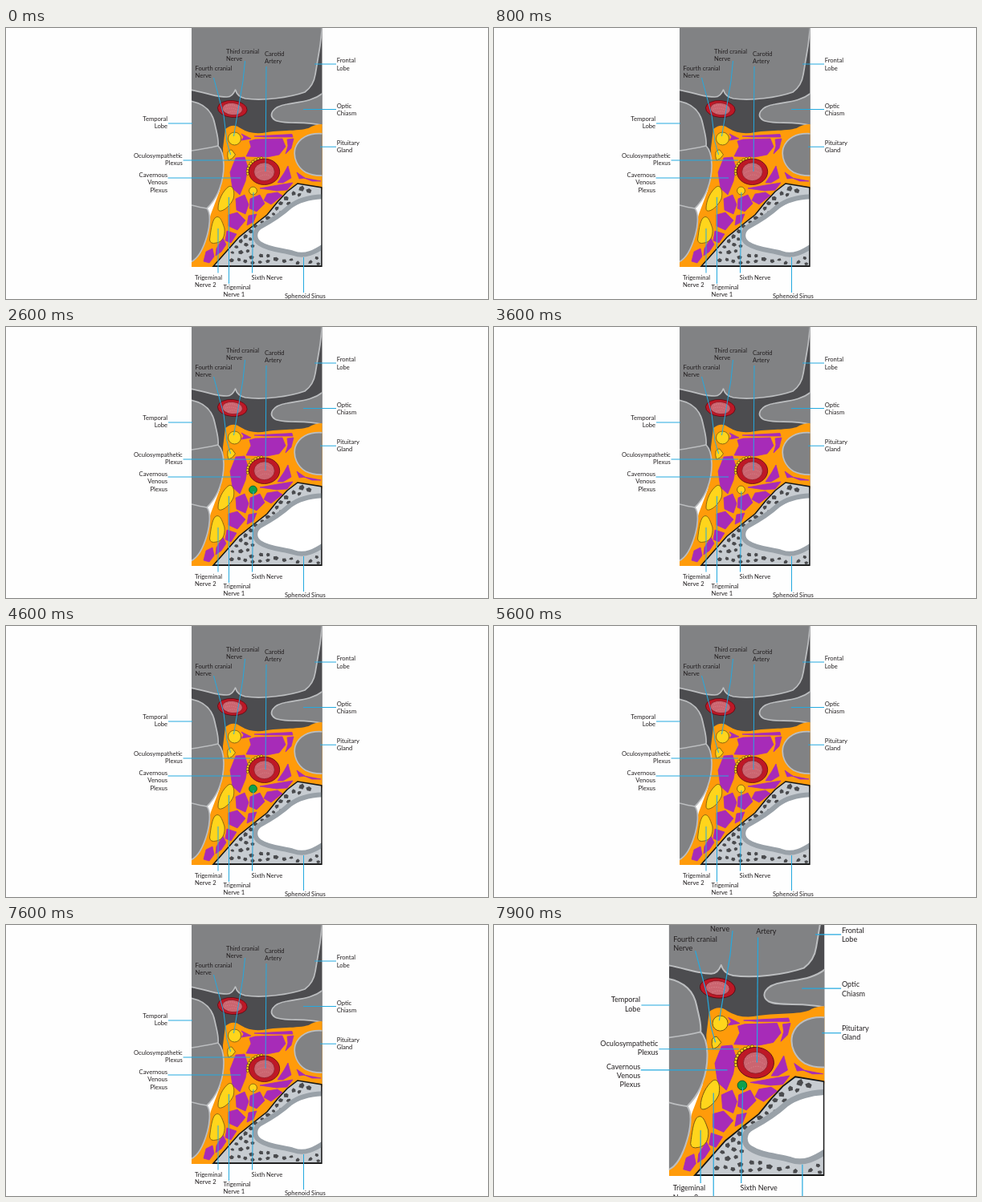
Recreate the animation shown at these times as an HTML page. Size 600 by 338 pixels, loop 8 s.

```html
<!DOCTYPE html>
<html lang="en">
<head>
<meta charset="utf-8">
<title>Cavernous sinus</title>
<style>
html, body { margin: 0; width: 100%; height: 100%; overflow: hidden; background: #fefefe; }
svg { display: block; width: 100vw; height: 100vh; }
text { font: 7.6px Lato, "Open Sans", sans-serif; fill: #231f20; }
.lobe { fill: #818284; stroke: #bcbec0; stroke-width: 1.7; stroke-linejoin: round; }
.crease { fill: none; stroke: #bcbec0; stroke-width: 1.5; }
.vein { fill: #a72bb8; stroke: #a72bb8; stroke-width: .8; stroke-linejoin: round; }
.nerve { fill: #ffd51c; stroke: #6d5210; stroke-width: .8; }
.wall { fill: #be1826; stroke: #5c0c14; stroke-width: .8; }
.blood { fill: #cb6570; stroke: #8a1722; stroke-width: .7; }
.grain { fill: none; stroke: #dd8f94; stroke-width: .7; stroke-dasharray: 1 1.5; }
.bone { fill: #c7ccd1; stroke: #161616; stroke-width: 1.5; stroke-linejoin: miter; }
.sinus { fill: #fff; stroke: #99a1a8; stroke-width: 6; }
.pore { fill: #4a4b4e; }
.lead { fill: none; stroke: #24a9df; stroke-width: 1; }
</style>
</head>
<body>
<svg viewBox="0 0 600 338" preserveAspectRatio="none">
  <defs>
    <clipPath id="panel"><rect x="231" y="-2" width="162.5" height="300"/></clipPath>
    <clipPath id="boneClip"><path d="M258 297.2L275 278L290 261L306 248L325 233L338 217L350 204L363 194L393.2 199V297.2Z"/></clipPath>
  </defs>
  <g id="scene">
    <g clip-path="url(#panel)">
      <path fill="#4c4c4f" d="M231-2H394V200H231Z"/>
      <path class="lobe" d="M229-4H394L391 22L385 58Q383 72 372 80C352 87 320 91 298 88Q288 86 285.5 77Q282 86 275 86C260 86 247 80 229 77Z"/>
      <path class="lobe" d="M396 80C382 92 365 92 350 95C331 98 326 109 335 115C346 121 374 115 396 122Z"/>
      <path fill="#ff9b0a" d="M273 126Q283 118 292 125Q306 134 325 130C345 127 373 129 380 123Q386 120 394 120V202L363 194L325 233L258 298H231V288L246 265L255 232L266 203L271 178L270 150Z"/>
      <path class="lobe" d="M229 91C246 94 257 104 260 120C262 130 265 138 264 147C273 156 273 181 266 200C262 212 256 219 250 225C256 232 253 250 250 260C245 277 239 289 229 292Z"/>
      <path class="crease" d="M264 147Q252 150 231 153M250 225Q242 224 231 221"/>
      <path class="lobe" d="M396 132C376 130 364 138 360 150C357 162 363 174 373 180Q383 185 396 184Z"/>
      <g id="veins"></g>
      <g id="plexus"></g>
      <g class="nerve">
        <circle cx="284.5" cy="138" r="8"/>
        <path d="M276 155Q278 151 281 152L285.5 158Q282 164 277 165Q275 160 276 155Z"/>
        <path d="M264 225C264 215 270 203 277 198C283 195 285 205 283 213C280 220 273 227 268 228Q264 229 264 225Z"/>
        <path d="M253.5 264C255 253 256 242 260 237C266 232 269 241 272 250C273 260 269 267 262 268Q254 270 253.5 264Z"/>
        <circle id="sixth" cx="307.5" cy="203" r="4.9"/>
      </g>
      <g transform="translate(321.5 179.3)">
        <ellipse class="wall" rx="19.2" ry="16.2"/>
        <ellipse class="blood" rx="12.8" ry="11.4"/>
        <path class="grain" d="M-9-4Q0-11 8-4M-10 2Q0-5 10 2M-7 7Q1 1 8 6"/>
      </g>
      <g transform="translate(281.8 101) rotate(5)">
        <ellipse class="wall" rx="18.4" ry="10.5"/>
        <ellipse class="blood" rx="12.6" ry="7.6"/>
        <path class="grain" d="M-8-3Q0-7 8-2M-9 1Q0-3 9 2M-5 5Q1 1 7 4"/>
      </g>
      <path class="bone" d="M258 297.2L275 278L290 261L306 248L325 233L338 217L350 204L363 194L393.2 199V297.2Z"/>
      <g clip-path="url(#boneClip)">
        <g id="pores" class="pore"></g>
        <path class="sinus" d="M400 210C380 210 363 215 353 223C341 234 329 241 318 247C308 252 308 264 316 269C328 277 345 277 358 281C372 286 384 280 400 269Z"/>
      </g>
      <path fill="none" stroke="#161616" stroke-width="1.4" d="M258 297H393V199"/>
    </g>
    <g id="leads"></g>
    <g id="labels"></g>
  </g>
</svg>
<script>
const LOOP = 8000, STEP = 100, BLINK = 200, ZOOM_AT = 7600;
const byId = id => document.getElementById(id);

function add(parent, tag, attrs, text) {
  const el = document.createElementNS('http://www.w3.org/2000/svg', tag);
  for (const key in attrs) el.setAttribute(key, attrs[key]);
  if (text) el.textContent = text;
  byId(parent).appendChild(el);
}

const veins = [
  '303 141 310 139 344 138 348 148 340 158 325 161 299 160 305 148',
  '293 132 305 138 293 140 296 136',
  '309 135 356 132.5 357 136 322 136',
  '350 139 358 138 355 150 348 157 351 147',
  '279 180 286 162 297 161 301 174 298 191 291 208 282 200',
  '286 213 297 208 302 220 298 232 287 227',
  '304 213 316 208 322 219 312 229 303 225',
  '325 207 338 205 344 209 330 220 321 215',
  '316 200 338 196 357 193 350 202 337 203',
  '338 193 346 181 351 172 355 187 345 193',
  '362 180 372 187 365 188',
  '371 187 392 191 381 191',
  '277 233 288 230 298 240 288 252 277 247',
  '302 234 312 232 308 242 300 246',
  '275 253 287 257 280 268 273 265',
  '262 275 270 262 274 270 268 279 261 284',
  '246 291 249 279 257 275 259 285 253 293'
];
veins.forEach(points => add('veins', 'polygon', { points, class: 'vein' }));

for (let a = 172; a <= 268; a += 11) {
  const r = a * Math.PI / 180;
  add('plexus', 'circle', {
    cx: 321.5 + 20.8 * Math.cos(r), cy: 179.3 + 17.2 * Math.sin(r), r: 1.7, class: 'nerve'
  });
}

// Bone pores: centre x, centre y, size
const pores = [
  368, 200, 4, 377, 203, 3.4, 358, 206, 3.3, 365, 208, 3, 349, 212, 3.4, 352, 219, 2.8,
  342, 219, 3, 337, 225, 3.2, 342, 230, 2.4, 333, 232, 2.6, 326, 237, 3.2, 319, 242, 2.8,
  311, 247, 3, 305, 254, 3.6, 298, 260, 3.2, 304, 263, 2.6, 292, 266, 3.2, 299, 270, 3,
  287, 273, 2.8, 292, 280, 3.6, 282, 280, 2.6, 301, 278, 3.2, 307, 272, 2.6, 281, 290, 3.4,
  290, 289, 2.6, 298, 291, 3, 306, 286, 3.6, 307, 293, 3, 317, 284, 3, 316, 292, 2.8,
  326, 284, 2.6, 326, 291, 3, 336, 288, 3.2, 346, 291, 3, 355, 289, 2.4, 363, 293, 2.8,
  379, 292, 3, 387, 287, 2.8, 389, 294, 2.6
];
let seed = 17;
const rand = () => (seed = seed * 16807 % 2147483647) / 2147483647;
for (let i = 0; i < pores.length; i += 3) {
  const [x, y, size] = pores.slice(i, i + 3), turn = rand() * 6;
  const points = [0, 1, 2, 3, 4].map(k => {
    const a = turn + k * 1.257, r = size * (.75 + rand() * .5);
    return `${x + r * Math.cos(a)} ${y + r * .85 * Math.sin(a)}`;
  }).join(' ');
  add('pores', 'polygon', { points });
}

const leads = [
  'M297.5 41L295 66L283.5 135', 'M258.5 62L271 109L275 142L279.5 158', 'M324 48L323 179',
  'M384 45H411', 'M370 101.5H411', 'M391 148.2H411', 'M202 119H232', 'M220.5 165H304',
  'M201.5 187H292', 'M264 250V305.5', 'M277.5 211V319', 'M308 205L306.5 305.5', 'M370.5 286V330'
];
leads.forEach(d => add('leads', 'path', { d, class: 'lead' }));

const labels = [
  [274, 32, 'Third cranial|Nerve'], [235.5, 52.7, 'Fourth cranial|Nerve'],
  [322, 35, 'Carotid|Artery'], [411.7, 43.3, 'Frontal|Lobe'],
  [411.7, 100, 'Optic|Chiasm'], [411.7, 146, 'Pituitary|Gland'],
  [201, 116, 'Temporal|Lobe', 'end'], [219.7, 162, 'Oculosympathetic|Plexus', 'end'],
  [201, 186, 'Cavernous|Venous|Plexus', 'end'], [235, 313.5, 'Trigeminal|Nerve 2'],
  [270.5, 326, 'Trigeminal|Nerve 1'], [305.5, 313.5, 'Sixth Nerve'], [347, 336.5, 'Sphenoid Sinus']
];
labels.forEach(([x, y, text, anchor = 'start']) => text.split('|').forEach((line, i) =>
  add('labels', 'text', { x, y: y + i * 9.4, 'text-anchor': anchor }, line)));

const scene = byId('scene'), sixth = byId('sixth');

function draw(now) {
  const t = Math.floor(now % LOOP / STEP) * STEP;
  const green = Math.floor(t / BLINK) % 2 === 1;
  sixth.style.fill = green ? '#0ea14b' : '#ffd51c';
  sixth.style.stroke = green ? '#0b5a2b' : '#6d5210';
  const zoom = 1 + .19 * Math.max(0, t - ZOOM_AT) / 300;
  scene.setAttribute('transform', `translate(300 219) scale(${zoom}) translate(-300 -219)`);
}

const start = performance.now();
function tick() {
  draw(performance.now() - start);
  requestAnimationFrame(tick);
}
tick();
</script>
</body>
</html>
```
